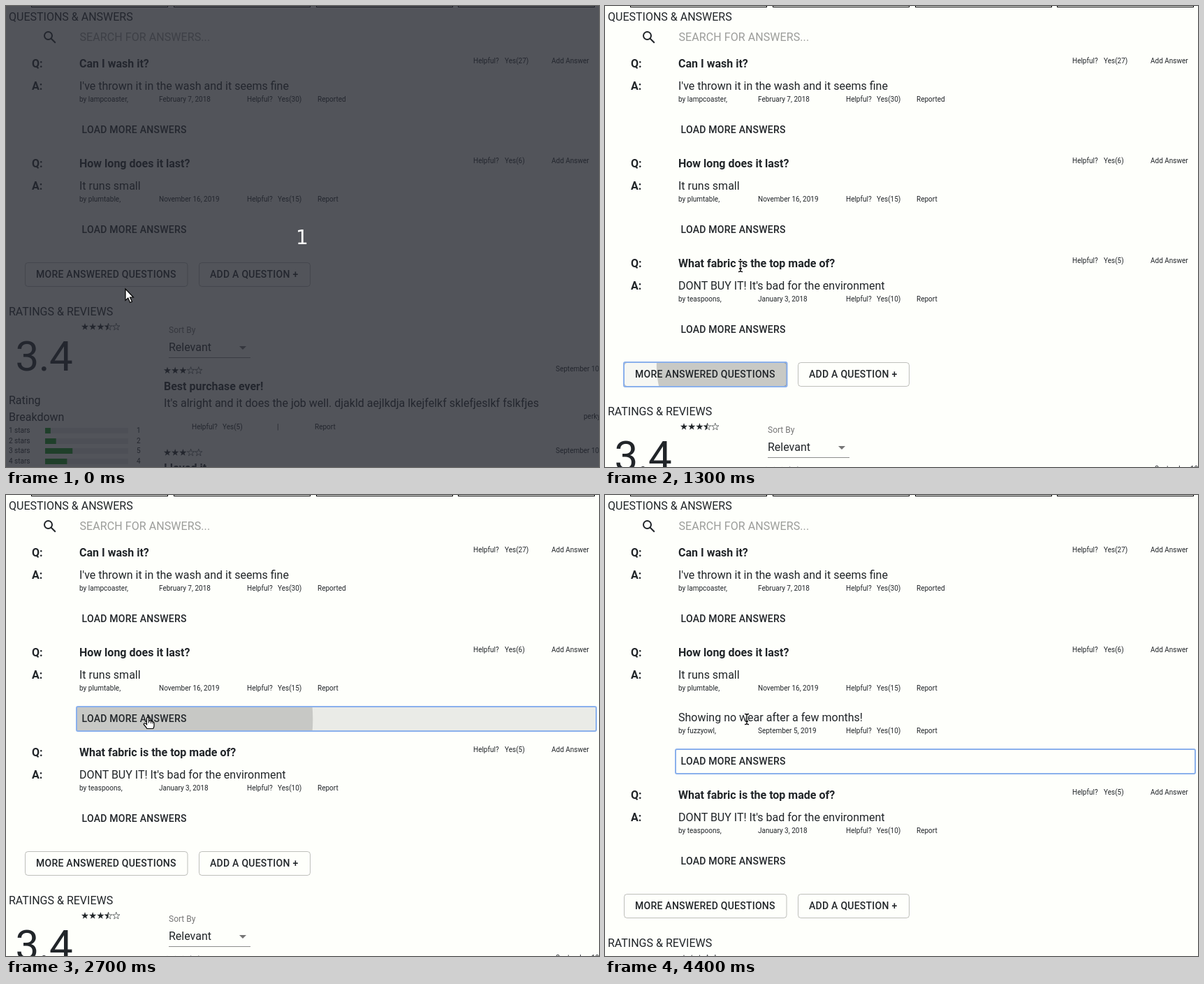
Write an HTML page that moves like this. It is 849 px wide and 660 px high and loops after 4.8 s.

```html
<!DOCTYPE html>
<html lang="en">
<head>
<meta charset="utf-8">
<title>Questions and answers</title>
<style>
html, body { margin: 0; width: 100%; height: 100%; overflow: hidden; background: #fefffb; }
svg { display: block; }
text { font: 16px Roboto, sans-serif; fill: #212529; white-space: pre; }
.b { font-weight: 700; }
.s { font-size: 10px; }
.btn { font-size: 14px; font-weight: 500; letter-spacing: .25px; }
.hint { fill: #9c9d9b; letter-spacing: .08px; }
.label { font-size: 12px; fill: #757575; }
.score { font-size: 60px; letter-spacing: -.5px; }
.count { font: 28px "DejaVu Sans", sans-serif; fill: #fff; }
</style>
</head>
<body>
<svg id="stage" width="849" height="660" viewBox="0 0 849 660"></svg>
<script>
const LOOP = 4800, STEP = 100, INK = '#212529';
const stage = document.getElementById('stage');

// cubic-bezier(.4, 0, .2, 1)
function ease(x) {
  if (x <= 0) return 0;
  if (x >= 1) return 1;
  let lo = 0, hi = 1, u = .5;
  for (let i = 0; i < 20; i++) {
    u = (lo + hi) / 2;
    const v = 1 - u;
    if (1.2 * u * v * v + .6 * u * u * v + u ** 3 < x) lo = u; else hi = u;
  }
  return u * u * (3 - 2 * u);
}
const mix = (a, b, k) => a + (b - a) * k;
const hover = (t, on, off) => ease((t - on) / 250) - ease((t - off) / 250);

const text = (x, y, str, cls = '') => `<text x="${x}" y="${y}" class="${cls}">${str}</text>`;
const rect = (x, y, w, h, fill, more = '') =>
  `<rect x="${x}" y="${y}" width="${w}" height="${h}" fill="${fill}" ${more}/>`;
const group = (dy, body) => `<g transform="translate(0 ${dy})">${body}</g>`;

// A press ripple, clipped to its button; cx and cy are relative to the button
function ripple(t, { down, up, cx, cy }, x, y, w, h) {
  if (t < down || t > up + 550) return '';
  const p = ease((t - down) / 660);
  const r = Math.hypot(Math.max(cx, w - cx) + 1, Math.max(cy, h - cy) + 1) * p;
  const alpha = (.1 + .2 * p) * .87 * (1 - ease((t - up) / 550));
  return `<svg x="${x}" y="${y}" width="${w}" height="${h}" overflow="hidden">
    <circle cx="${cx}" cy="${cy}" r="${r}" fill-opacity="${alpha}"/></svg>`;
}

function button(t, x, y, w, label, { pad = 16, border, glow = 0, press, focus } = {}) {
  let out = rect(x, y, w, 35, '#000', `rx="4" fill-opacity="${.08 * glow}"`);
  if (press) out += ripple(t, press, x, y, w, 35);
  if (border) out += rect(x + .5, y + .5, w - 1, 34, 'none', 'rx="4" stroke="#000" stroke-opacity=".25"');
  if (focus) out += rect(x, y, w, 35, 'none', 'rx="2" stroke="#8ab0ec" stroke-width="2"');
  return out + text(x + pad, y + 22, label, 'btn');
}

const answer = (y, str, user, date, yes, report) =>
  text(105, y, str) + text(105, y + 17, `by ${user},`, 's') + text(219, y + 17, date, 's') +
  text(345, y + 17, 'Helpful?', 's') + text(389, y + 17, `Yes(${yes})`, 's') +
  text(446, y + 17, report, 's');

const question = (y, str, yes) =>
  text(37, y, 'Q:', 'b') + text(105, y, str, 'b') + text(37, y + 32, 'A:', 'b') +
  text(669, y - 6, 'Helpful?', 's') + text(714, y - 6, `Yes(${yes})`, 's') +
  text(781, y - 6, 'Add Answer', 's');

const loadMore = (t, y, state) => button(t, 101, y, 744, 'LOAD MORE ANSWERS', { pad: 7.5, ...state });

function star(cx, cy, fill) {
  const at = i => {
    const r = i % 2 ? 2.1 : 5.4, a = i * Math.PI / 5;
    return `${(cx + r * Math.sin(a)).toFixed(2)},${(cy - r * Math.cos(a)).toFixed(2)}`;
  };
  const poly = (from, to, style) => {
    let pts = '';
    for (let i = from; i <= to; i++) pts += at(i) + ' ';
    return `<polygon points="${pts}" ${style}/>`;
  };
  if (fill === 1) return poly(0, 9, `fill="${INK}"`);
  return poly(0, 9, `fill="none" stroke="${INK}" stroke-width=".6"`) +
    (fill ? poly(5, 10, `fill="${INK}"`) : '');
}
const stars = (x, y, n) => [0, 1, 2, 3, 4].map(i =>
  star(x + 5.5 + 11.2 * i, y, Math.max(0, Math.min(1, n - i)))).join('');

function header() {
  return [36, 240, 444, 647].map(x =>
    rect(x + .5, -9.5, 195, 11, 'none', 'stroke="#000"')).join('') +
    text(4, 21, 'QUESTIONS &amp; ANSWERS') +
    `<g fill="none" stroke="${INK}" stroke-width="2"><circle cx="60.5" cy="42.5" r="5.5"/>
     <path d="M64.5 46.5L70.8 52.8"/></g>` +
    text(105.5, 50, 'SEARCH FOR ANSWERS...', 'hint');
}

function reviews() {
  const bars = [1, 2, 5, 4].map((n, i) => {
    const y = Math.round(604 + 14.7 * i);
    return text(4, y + 7, `${i + 1} stars`, 's') + rect(56, y, 119, 8, '#e9e9e6') +
      rect(56, y, 7.85 * n, 8, '#109c18') + text(187, y + 7, n, 's');
  }).join('');
  return text(4, 443, 'RATINGS &amp; REVIEWS') + stars(107.5, 459.5, 3.5) +
    text(13.5, 522, '3.4', 'score') + text(4, 570, 'Rating') + text(4, 594, 'Breakdown') + bars +
    text(233, 468, 'Sort By', 'label') + text(233, 494, 'Relevant') +
    '<path d="M334 487h10l-5 5z" fill="#757575"/>' + rect(233, 503, 117, 1, '#8d8d8c') +
    stars(225.5, 522, 3) + text(787, 523, 'September 10, 2020', 's') +
    text(226, 550, 'Best purchase ever!', 'b') +
    text(226, 574, "It's alright and it does the job well. djakld aejlkdja lkejfelkf sklefjeslkf fslkfjes") +
    text(827, 591, 'perkydog', 's') + text(266, 606, 'Helpful?', 's') + text(310, 606, 'Yes(5)', 's') +
    text(388, 606, '|', 's') + text(442, 606, 'Report', 's') +
    stars(225.5, 639.5, 3) + text(787, 640, 'September 10, 2020', 's') + text(226, 667, 'I loved it', 'b');
}

const CURSORS = {
  arrow: '<path d="M0 0V16.5L3.8 13L6.6 19.5L9.4 18.3L6.6 12H11.4Z" fill="#fff" stroke="#000" stroke-width="1.2"/>',
  hand: `<path d="M-1.5 6V-1.2Q-1.5-2.6 0-2.6T1.5-1.2V2.5Q4 1.5 4.4 3Q6.6 2.3 7 4Q9 3.6 9 5.5V9.5
    Q9 11.5 7.6 13.5H-1Q-3 10.5-5.4 8Q-6.4 6.6-5 6T-1.5 7.5Z" fill="#fff" stroke="#000" stroke-width="1.2"/>
    <path d="M1.5 3V5.5M4.4 3.5V6M7 4.5V6.5" stroke="#000"/>`,
  beam: ['#fff" stroke-width="3', '#000" stroke-width="1.3'].map(s =>
    `<path d="M-3-7.5Q0-7.5 0-6Q0-7.5 3-7.5M0-6V6M-3 7.5Q0 7.5 0 6Q0 7.5 3 7.5M-2 3H2" fill="none" stroke="${s}"/>`).join('')
};

function pointer(t) {
  const a = ease((t - 250) / 350), b = ease((t - 1650) / 400);
  const x = mix(mix(171, 194, a), 203, b), y = mix(mix(405, 373, a), 321, b);
  let kind;
  if (t < 400) kind = 'arrow';
  else if (t < 1200) kind = 'hand';
  else if (t >= 2800 || y > 358) kind = 'beam';
  else kind = y > 338 ? 'arrow' : 'hand';
  return `<g transform="translate(${x} ${y})">${CURSORS[kind]}</g>`;
}

function draw(t) {
  const third = t >= 1200, extra = t >= 2800;
  const low = extra ? 61 : 0, base = low + (third ? 143 : 0);

  let out = header() +
    question(88, 'Can I wash it?', 27) +
    answer(120, "I've thrown it in the wash and it seems fine", 'lampcoaster', 'February 7, 2018', 30, 'Reported') +
    loadMore(t, 160) +
    question(231, 'How long does it last?', 6) +
    answer(263, 'It runs small', 'plumtable', 'November 16, 2019', 15, 'Report');
  if (extra) out += answer(324, 'Showing no wear after a few months!', 'fuzzyowl', 'September 5, 2019', 10, 'Report');
  out += loadMore(t, 303 + low, {
    glow: hover(t, 1950, 2800), focus: t >= 2600,
    press: { down: 2502, up: 2760, cx: 102, cy: 18 }
  });
  if (third) out += group(low,
    question(374, 'What fabric is the top made of?', 5) +
    answer(406, "DONT BUY IT! It's bad for the environment", 'teaspoons', 'January 3, 2018', 10, 'Report') +
    loadMore(t, 446));

  out += group(base,
    button(t, 27, 367, 233.5, 'MORE ANSWERED QUESTIONS', {
      border: true, glow: hover(t, 400, 1200), focus: t >= 1100 && t < 2600,
      press: { down: 1003, up: 1200, cx: 167, cy: 6 }
    }) +
    button(t, 276, 367, 160, 'ADD A QUESTION +', { border: true }) + reviews());

  if (t < 100) out += rect(0, 0, 849, 660, 'rgba(36,39,47,.79)') + text(415, 341, '1', 'count');
  stage.innerHTML = out + pointer(t);
}

// The screen advances ten times a second
let shown = -1;
function tick() {
  const t = Math.floor(performance.now() % LOOP / STEP) * STEP;
  if (t !== shown) draw(shown = t);
  requestAnimationFrame(tick);
}
tick();
</script>
</body>
</html>
```
